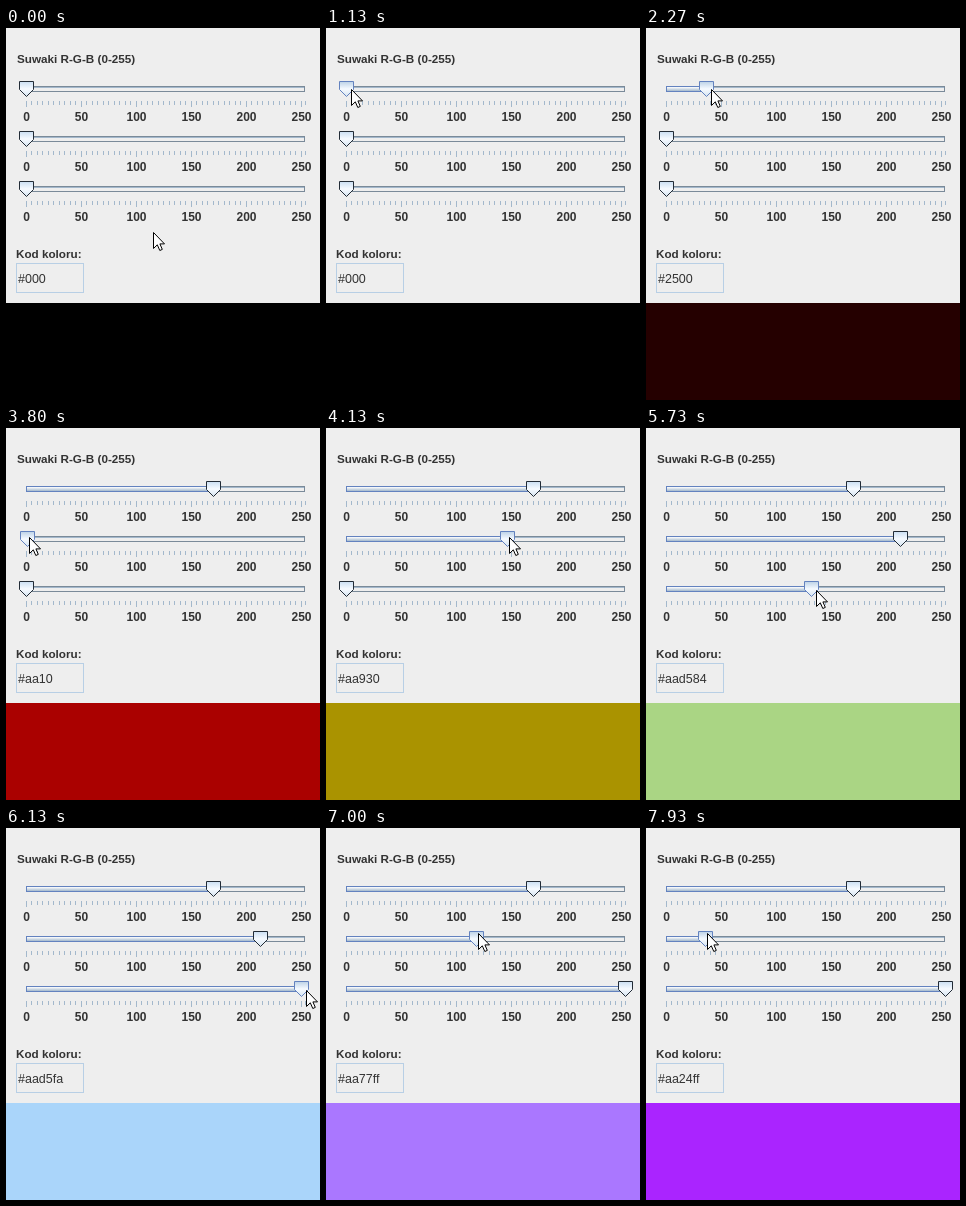
An HTML page with a canvas that plays this animation: 314x372 px, repeating every 8 s.

```html
<!DOCTYPE html>
<html lang="pl">
<head>
<meta charset="utf-8">
<style>
  html, body { margin: 0; width: 100%; height: 100%; overflow: hidden; background: #eee; }
  canvas { display: block; }
</style>
</head>
<body>
<canvas id="stage" width="314" height="372"></canvas>
<script>
const ctx = document.getElementById('stage').getContext('2d');
const LOOP = 8000, FPS = 15;
const FAMILY = '"Liberation Sans", Arial, sans-serif';
const TITLE = `bold 11.7px ${FAMILY}`;
const TICK = `bold 12px ${FAMILY}`;
const FIELD = `12.5px ${FAMILY}`;

const arrow = new Path2D('M.5 .5V16.5L4.3 12.8 6.8 18.5 9.3 17.4 6.9 11.9H11.5Z');
const thumbShape = new Path2D('M-6.5 .5H7.5V8.5L.5 15.5 -6.5 8.5Z');

const clamp = p => Math.min(1, Math.max(0, p));
const smooth = p => p * p * (3 - 2 * p);
const easeOut = p => 1 - (1 - p) ** 3;
const mix = (a, b, p) => a + (b - a) * p;
const progress = (step, start, end) => clamp((step - start) / (end - start));

const valueToX = v => Math.min(299, Math.floor(20 + v * 11 / 10));
const trackY = slider => 58 + 50 * slider;

// Times are in steps of 1/15 s; dx, dy place the pointer relative to the thumb.
const drags = [
  { slider: 0, from: 0, to: 170, arrive: 17, start: 28.9, end: 45.8, ease: smooth, dx: 5, dy: 3 },
  { slider: 1, from: 0, to: 213, arrive: 56, start: 56.66, end: 65.13, ease: smooth, dx: 2, dy: 1 },
  { slider: 2, from: 0, to: 255, arrive: 78.2, start: 78.43, end: 93.23, ease: smooth, dx: 5, dy: 4 },
  { slider: 1, from: 213, to: 36, arrive: 100.5, start: 101, end: 119, ease: easeOut, dx: 2, dy: -3 }
];

const dragValue = (d, step) =>
  Math.round(mix(d.from, d.to, d.ease(progress(step, d.start, d.end))));
const grabPoint = (d, step) =>
  [valueToX(dragValue(d, step)) + d.dx, trackY(d.slider) + d.dy];

function sliderValue(slider, step) {
  const own = drags.filter(d => d.slider === slider);
  return dragValue(own.findLast(d => d.start <= step) ?? own[0], step);
}

function pointerAt(step) {
  const i = drags.findIndex(d => step < d.end);
  const d = drags[i] ?? drags.at(-1);
  if (step >= d.arrive) return grabPoint(d, step);
  const last = drags[i - 1];
  const origin = last ? grabPoint(last, last.end) : [147, 204];
  const p = smooth(progress(step, last ? last.end : 2, d.arrive));
  return grabPoint(d, step).map((v, axis) => Math.round(mix(origin[axis], v, p)));
}

function rect(color, x, y, w, h) {
  ctx.fillStyle = color;
  ctx.fillRect(x, y, w, h);
}

function frame(color, x, y, w, h) {
  ctx.strokeStyle = color;
  ctx.lineWidth = 1;
  ctx.strokeRect(x + .5, y + .5, w - 1, h - 1);
}

function text(str, x, y, font, align = 'left') {
  ctx.font = font;
  ctx.textAlign = align;
  ctx.fillStyle = '#333';
  ctx.fillText(str, x, y);
}

function verticalGradient(y0, y1, ...colors) {
  const gradient = ctx.createLinearGradient(0, y0, 0, y1);
  colors.forEach((color, i) => gradient.addColorStop(i / (colors.length - 1), color));
  return gradient;
}

function paint(shape, x, y, fill, stroke) {
  ctx.save();
  ctx.translate(x, y);
  ctx.fillStyle = fill;
  ctx.strokeStyle = stroke;
  ctx.fill(shape);
  ctx.stroke(shape);
  ctx.restore();
}

function drawSlider(y, value, focused) {
  const x = valueToX(value);
  frame('#7a8a99', 20, y, 279, 6);
  rect('#a3b8cc', 21, y + 1, 277, 1);
  if (x > 20) {
    rect(verticalGradient(y + 1, y + 5, '#fff', '#a3b8cc'), 20, y + 1, x - 20, 4);
    frame('#6382bf', 20, y, x - 20, 6);
  }
  for (let v = 0; v <= 255; v += 5) {
    const major = v % 50 === 0, tickX = valueToX(v);
    rect('#a3b8cc', tickX, y + 15, 1, major ? 6 : 4);
    if (major) text(v, tickX + .5, y + 35, TICK, 'center');
  }
  const shade = verticalGradient(0, 16, focused ? '#b8cfe5' : '#c8ddf2', '#f6faff', '#d2e2ef');
  paint(thumbShape, x, y - 5, shade, focused ? '#6382bf' : '#222b36');
}

function render(ms) {
  const step = Math.floor(ms % LOOP / 1000 * FPS + .06);
  const values = [0, 1, 2].map(slider => sliderValue(slider, step));
  const focus = drags.findLast(d => d.arrive <= step)?.slider;

  rect('#eee', 0, 0, 314, 275);
  rect(`rgb(${values})`, 0, 275, 314, 97);
  text('Suwaki R-G-B (0-255)', 11, 35, TITLE);
  values.forEach((value, i) => drawSlider(trackY(i), value, i === focus));
  text('Kod koloru:', 10, 230, TITLE);
  frame('#b8cfe5', 10, 235, 68, 30);
  text('#' + values.map(v => v.toString(16)).join(''), 12, 255, FIELD);
  paint(arrow, ...pointerAt(step), '#fff', '#000');
}

const start = performance.now();
function tick() {
  render(performance.now() - start);
  requestAnimationFrame(tick);
}
tick();
</script>
</body>
</html>
```
